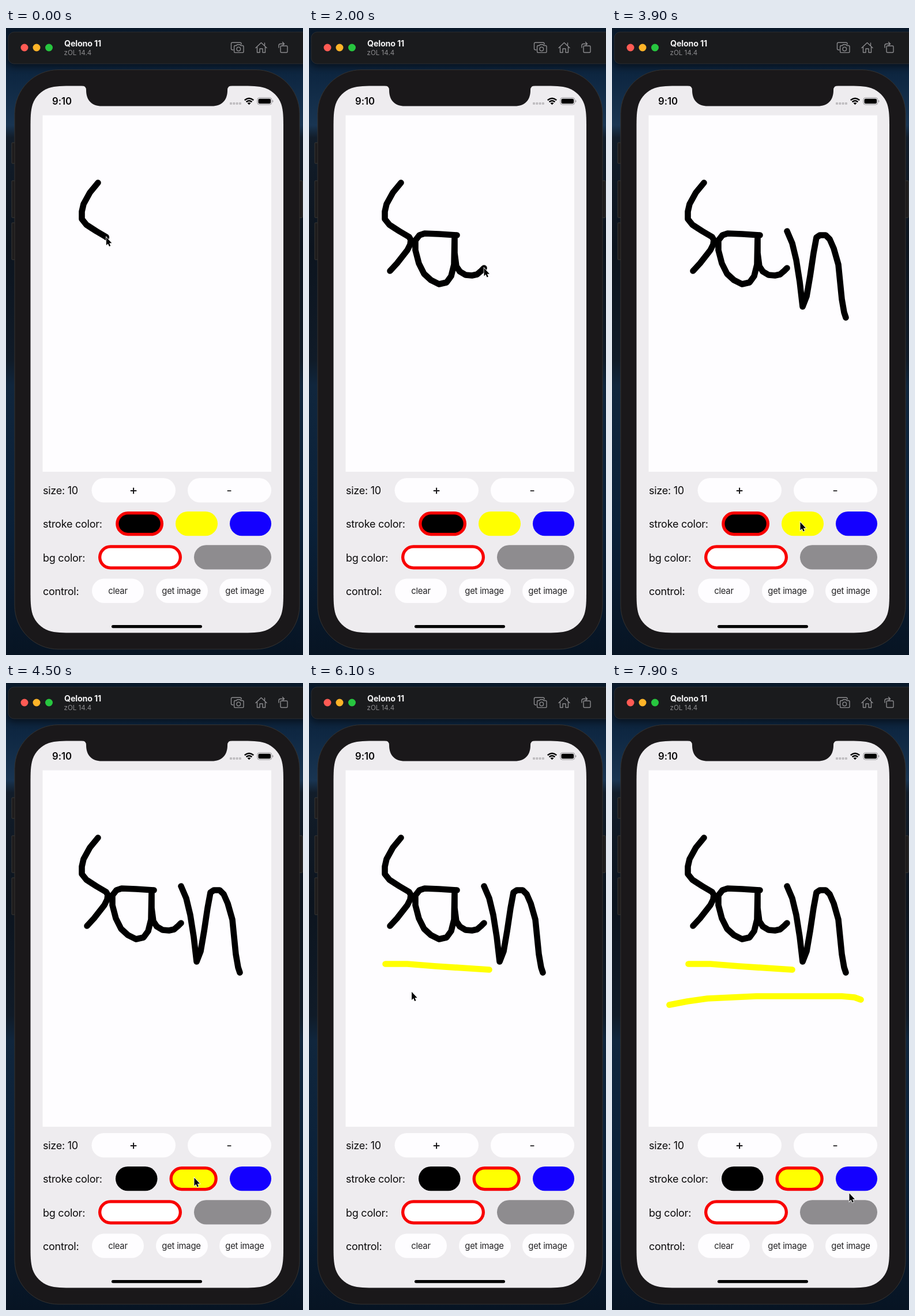
Write an HTML page that moves like this. It is 515 px wide and 1088 px high and loops after 8000 ms.

```html
<!DOCTYPE html>
<html lang="en">
<head>
<meta charset="utf-8">
<title>Drawing pad</title>
<style>
  html, body { margin: 0; width: 100%; height: 100%; overflow: hidden; background: #0b1726; }
  svg { display: block; width: 515px; height: 1088px; font-family: Inter, "Open Sans", sans-serif; }
  .label { font-size: 18px; letter-spacing: -.25px; fill: #0b0a0b; }
  .btn { fill: #fefdff; }
  .caption { font-size: 14.8px; letter-spacing: -.2px; text-anchor: middle; fill: #222123; }
  .sign { font-size: 21px; text-anchor: middle; fill: #1a191b; }
  .icon { fill: none; stroke: #8b8b8e; stroke-width: 1.4; stroke-linejoin: round; stroke-linecap: round; }
  .side { fill: #1d1b1c; stroke: #3b3835; stroke-width: 1; }
  .ink { fill: none; stroke: #000; stroke-width: 10.6; stroke-linecap: round; stroke-linejoin: round; }
  .yellow { stroke: #ff0; }
  .ring { stroke: #f80000; stroke-width: 5.3; }
</style>
</head>
<body>
<svg viewBox="0 0 515 1088">
  <defs>
    <linearGradient id="sky" x1="0" y1="0" x2="0" y2="1">
      <stop offset="0" stop-color="#0a192a"/>
      <stop offset=".08" stop-color="#0e2742"/>
      <stop offset=".155" stop-color="#193552"/>
      <stop offset=".175" stop-color="#121d2a"/>
      <stop offset=".35" stop-color="#0c141e"/>
      <stop offset=".53" stop-color="#101b28"/>
      <stop offset=".57" stop-color="#10263d"/>
      <stop offset=".8" stop-color="#0a2038"/>
      <stop offset="1" stop-color="#071423"/>
    </linearGradient>
    <filter id="soft" x="-10%" y="-30%" width="120%" height="180%">
      <feGaussianBlur stdDeviation="6"/>
    </filter>
  </defs>
  <rect width="515" height="1088" fill="url(#sky)"/>

  <!-- window bar -->
  <rect x="2" y="14" width="530" height="54" rx="12" opacity=".45" filter="url(#soft)"/>
  <rect x="4" y="7" width="530" height="55" rx="10" fill="#1a1b1d" stroke="#303134" stroke-width=".8"/>
  <circle cx="32" cy="34" r="6.5" fill="#ff5b54"/>
  <circle cx="53" cy="34" r="6.5" fill="#fdb428"/>
  <circle cx="74.5" cy="34" r="6.5" fill="#27c63f"/>
  <text x="101" y="32" font-size="14.3" font-weight="700" letter-spacing="-.2" fill="#f1f1f2">Qelono 11</text>
  <text x="100.5" y="46.5" font-size="11.6" fill="#8c8c8f">zOL 14.4</text>
  <g class="icon">
    <path d="M394 38h-1.5q-2-.2-2-2.200v-8.500q0-2 2-2h13.500q2 0 2 2v1"/>
    <path d="M396.500 30.500h3l1.200-1.700h5.200l1.200 1.700h3q1.900 0 1.900 1.900v8.300q0 1.900-1.900 1.900h-12.600q-1.900 0-1.900-1.900v-8.300q0-1.900 1.900-1.900z"/>
    <circle cx="403.300" cy="36.400" r="3.300"/>
    <path d="M433 34.500l9.500-9 9.500 9M435.500 33v9.500h4.500v-6.500h5v6.500h4.500v-9.500M448.500 30v-4"/>
    <rect x="476" y="31" width="12" height="11.500" rx="1.500"/>
    <path d="M473 34v-3.500q0-3 3-3h6M479.500 24.500l3 3-3 3"/>
  </g>

  <!-- phone -->
  <rect class="side" x="10" y="199" width="8" height="36" rx="1"/>
  <rect class="side" x="10" y="265" width="8" height="64" rx="1"/>
  <rect class="side" x="10" y="338" width="8" height="64" rx="1"/>
  <rect class="side" x="506" y="265" width="8" height="64" rx="1"/>
  <rect x="15" y="72.500" width="494" height="1005.500" rx="76" fill="#1a181a" stroke="#353331"/>
  <path id="screen" fill="#eeecef"/>
  <path d="M131 100q8 0 8 8c0 17.500 10 27.500 27 27.500H357c17 0 27-10 27-27.500q0-8 8-8z" fill="#1a181a"/>
  <text x="80" y="133" font-size="16.8" font-weight="600" letter-spacing="-.1" fill="#0b0a0b">9:10</text>
  <g fill="#bfbdc0">
    <rect x="388" y="129" width="4" height="4" rx="1"/>
    <rect x="393.300" y="129" width="4" height="4" rx="1"/>
    <rect x="398.600" y="129" width="4" height="4" rx="1"/>
    <rect x="403.900" y="129" width="4" height="4" rx="1"/>
  </g>
  <g fill="none" stroke="#000" stroke-width="2.500">
    <path d="M413.800 125.300q7.700-6.600 15.400 0M416.600 128.400q4.900-4.200 9.800 0"/>
  </g>
  <path d="M418.500 130.300q3-2.200 6 0l-3 3z"/>
  <rect x="435.800" y="121" width="25" height="12" rx="3.600" fill="none" stroke="#969498"/>
  <rect x="437.500" y="122.700" width="21.600" height="8.600" rx="2.200"/>
  <path d="M462 125v4q1.500-.5 1.500-2t-1.500-2z" fill="#969498"/>
  <rect x="183" y="1036" width="157" height="5.200" rx="2.600"/>

  <!-- controls -->
  <rect x="63.500" y="151.500" width="396.500" height="618.500" fill="#fefdff"/>
  <text class="label" x="64" y="809">size: 10</text>
  <text class="label" x="64" y="867">stroke color:</text>
  <text class="label" x="64" y="925.500">bg color:</text>
  <text class="label" x="64" y="983.500">control:</text>
  <g class="btn">
    <rect x="148.500" y="781" width="145.500" height="42.300" rx="21.150"/>
    <rect x="315" y="781" width="145" height="42.300" rx="21.150"/>
    <rect x="149" y="955.500" width="90" height="42.300" rx="21.150"/>
    <rect x="260" y="955.500" width="90" height="42.300" rx="21.150"/>
    <rect x="370" y="955.500" width="90" height="42.300" rx="21.150"/>
  </g>
  <text class="sign" x="221" y="809" font-weight="500" style="font-size:22px">+</text>
  <text class="sign" x="387" y="809.500">-</text>
  <text class="caption" x="194" y="982">clear</text>
  <text class="caption" x="304" y="982">get image</text>
  <text class="caption" x="414" y="982">get image</text>
  <rect x="388" y="839" width="72" height="42.300" rx="21.150" fill="#1400ff"/>
  <rect class="ring" x="162.650" y="899.850" width="139.700" height="37" rx="18.500" fill="#fff"/>
  <rect x="326" y="897.200" width="134" height="42.300" rx="21.150" fill="#8e8c8f"/>
  <g id="blackOn">
    <rect class="ring" x="192.850" y="841.650" width="77.500" height="37" rx="18.500"/>
    <rect x="294" y="839" width="73" height="42.300" rx="21.150" fill="#ff0"/>
  </g>
  <g id="yellowOn">
    <rect x="190" y="839" width="72.500" height="42.300" rx="21.150"/>
    <rect class="ring" x="286.150" y="841.650" width="78" height="37" rx="18.500" fill="#ff0"/>
  </g>

  <g id="inks" transform="translate(.5 .5)"></g>
  <path id="cursor" d="M.5 .5V14.500L3.500 11.600 5.600 16.500 7.900 15.500 5.800 10.700H10Z" stroke="#fff" stroke-width="1.600" paint-order="stroke"/>
</svg>
<script>
const LOOP = 8000, STEP = 100, PICK = 4300;
const $ = id => document.getElementById(id);

// Rectangle whose corners ease smoothly into the sides
function smoothRect(left, top, right, bottom, r) {
  const corner = [[1.53, 0], [1.09, 0], [.87, 0], [.63, .075], [.37, .17], [.17, .37], [.075, .63], [0, .87], [0, 1.09], [0, 1.53]];
  const place = (x, y, sx, sy) => corner.map(([a, b]) => `${x + sx * a * r} ${y + sy * b * r}`);
  const sides = [
    place(left, top, 1, 1), place(left, bottom, 1, -1).reverse(),
    place(right, bottom, -1, -1), place(right, top, -1, 1).reverse()
  ];
  return "M" + sides.map(([first, ...rest]) => `${first}C${rest.join(" ")}`).join("L") + "Z";
}
$("screen").setAttribute("d", smoothRect(42.5, 100.5, 481, 1049.5, 50));

// Pen strokes: start and end time, class, points
const strokes = [
  [-700, 400, "ink", "159,268 145,285 134,305 131,318 131,331 139,341 156,352 173,362 176,367 175,375 170,385 152,408 140,421"],
  [1000, 2000, "ink", "256,359 225,357 200,356 191,359 184,368 184,385 190,408 199,426 211,437 225,444 238,441 246,430 251,410 252,361 252,390 255,413 261,422 271,428 282,429 291,427 298,421 303,416"],
  [2300, 3300, "ink", "303,352 312,373 319,402 325,440 330,483 337,465 343,430 349,390 354,363 360,359 370,359 377,366 384,382 392,410 395,440 398,470 402,493 405,502"],
  [5500, 6000, "ink yellow", "132,487 170,487 220,491 312,497"],
  [6170, 6870, "ink yellow", "99,558 130,552 165,547 250,543 398,543 420,545 431,549"]
].map(([from, to, cls, points]) => {
  const el = document.createElementNS("http://www.w3.org/2000/svg", "polyline");
  el.setAttribute("class", cls);
  el.setAttribute("points", points);
  $("inks").append(el);
  const length = el.getTotalLength();
  const at = part => {
    const p = el.getPointAtLength(length * part);
    return [p.x, p.y];
  };
  return { from, to, el, length, at };
});

// Pointer stops while the pen is up
const stops = [
  [900, 251, 358], [3900, 326, 857], [4500, 326, 858],
  [5400, 138, 498], [7900, 411, 885], [LOOP, 411, 885]
];
for (const s of strokes) {
  stops.push([s.from, ...s.at(0)], [s.to, ...s.at(1)]);
}
stops.sort((a, b) => a[0] - b[0]);

const clamp = v => Math.max(0, Math.min(1, v));
const ease = v => v * v * (3 - 2 * v);

function pointer(t) {
  const pen = strokes.find(s => t >= s.from && t <= s.to);
  if (pen) return pen.at((t - pen.from) / (pen.to - pen.from));
  const i = stops.findIndex(s => s[0] > t);
  const [t0, x0, y0] = stops[i - 1], [t1, x1, y1] = stops[i];
  const k = ease((t - t0) / (t1 - t0));
  return [x0 + (x1 - x0) * k, y0 + (y1 - y0) * k];
}

function draw(t) {
  for (const { from, to, el, length } of strokes) {
    const done = length * clamp((t - from) / (to - from));
    el.style.display = t < from ? "none" : "";
    el.style.strokeDasharray = t >= to ? "none" : `${Math.max(.01, done)} ${length + 20}`;
  }
  $("blackOn").style.display = t < PICK ? "" : "none";
  $("yellowOn").style.display = t < PICK ? "none" : "";
  const [x, y] = pointer(t);
  $("cursor").setAttribute("transform", `translate(${x} ${y})`);
}

const start = performance.now();
function tick(now) {
  const t = Math.max(0, now - start) % LOOP;
  draw(Math.floor(t / STEP) * STEP);
  requestAnimationFrame(tick);
}
draw(0);
requestAnimationFrame(tick);
</script>
</body>
</html>
```
